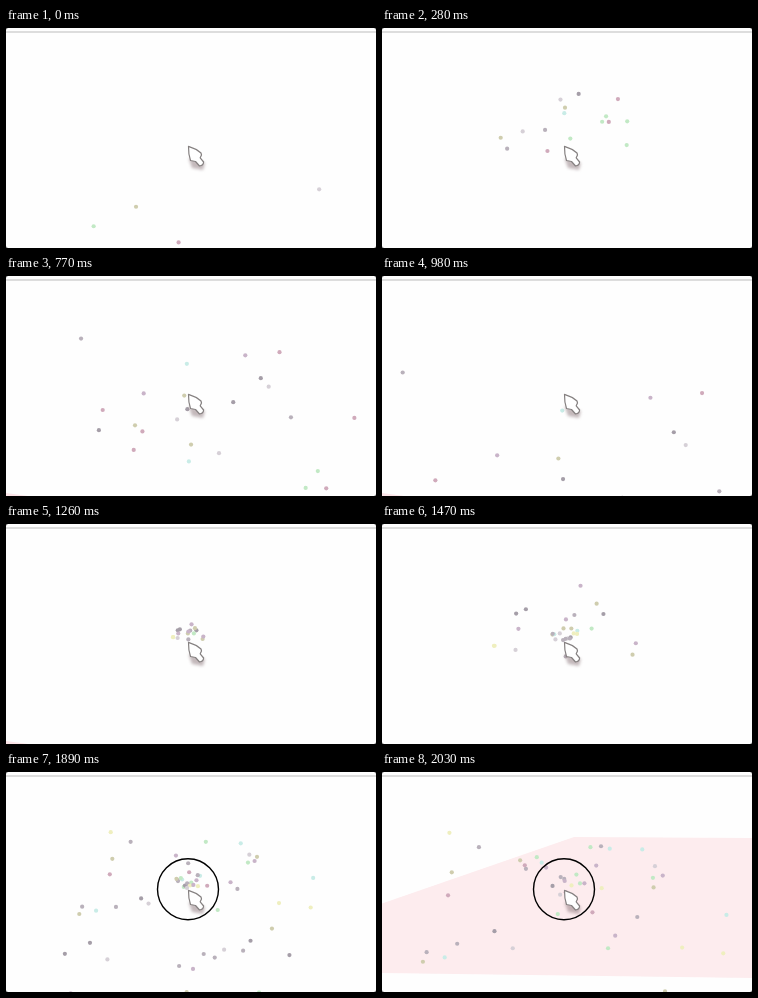
Write an HTML page that moves like this. It is 370 px wide and 220 px high and loops after 2.1 s.

```html
<!DOCTYPE html>
<html lang="en">
<head>
<meta charset="utf-8">
<title>Pointer sparks</title>
<style>
  html, body { margin: 0; width: 100%; height: 100%; overflow: hidden; background: #fff; }
  svg { display: block; width: 370px; height: 220px; }
</style>
</head>
<body>
<svg viewBox="0 0 370 220">
  <defs>
    <filter id="soft" x="-60%" y="-60%" width="220%" height="220%">
      <feGaussianBlur stdDeviation="1.8"/>
    </filter>
  </defs>
  <rect width="370" height="220" fill="#555"/>
  <rect width="370" height="220" rx="2.5" fill="#fefefe"/>
  <path d="M0 4H370" stroke="#d2d2d2" stroke-width="1.5"/>
  <path id="band" d="M0 131.500L192 65L370 66V206L0 201Z" fill="#fdecee"/>
  <path id="corner" d="M0 217L22 220H0Z" fill="#fce4e8"/>
  <g id="dots"></g>
  <path d="M182.500 130L199 135L197 142L186 140Z" fill="#8a7479" opacity=".5" filter="url(#soft)"/>
  <path d="M182.500 118.300Q190 120.500 195 125L195.500 127L194.200 129.800L197.600 134Q197.500 137.500 193.500 138L189.500 133.500L184.500 132.500Q182.300 126 182.500 118.300Z"
    fill="#fff" stroke="#858080" stroke-width="1.200" stroke-linejoin="round"/>
  <circle id="ring" cx="182" cy="117.300" r="30.500" fill="none" stroke="#000" stroke-width="1.400"/>
</svg>
<script>
const LOOP = 2100, STEP = 70;
const GRAVITY = 0.00095; // px per ms²
const ORIGIN = { x: 182, y: 118 };
const TONES = [
  '#b9b1bb', '#b9b1bb', '#a59ea8', '#d6d0d7', '#c9b4c9',
  '#d0aabb', '#c9ece7', '#efefbf', '#cfcdae', '#c2e9c5'
];
const byId = id => document.getElementById(id);
const sparks = [];

let seed = 11;
function random(min, max) {
  seed = (seed * 16807) % 2147483647;
  return min + (max - min) * seed / 2147483647;
}

// Throws sparks up from the pointer tip, all at the same moment.
function burst(born, count) {
  for (let i = 0; i < count; i++) {
    const node = document.createElementNS('http://www.w3.org/2000/svg', 'circle');
    node.setAttribute('r', 2.1);
    node.setAttribute('fill', TONES[Math.floor(random(0, TONES.length))]);
    byId('dots').append(node);
    sparks.push({ born, vx: random(-0.27, 0.27), vy: random(-0.34, -0.05), node });
  }
}

burst(-820, 16);
burst(45, 16);
burst(357, 16);
burst(1203, 16);
burst(1420, 14);
burst(1600, 18);
burst(1840, 17);

function show(node, visible) {
  node.style.display = visible ? '' : 'none';
}

function render(time) {
  for (const { born, vx, vy, node } of sparks) {
    const age = time - born;
    const y = ORIGIN.y + vy * age + GRAVITY / 2 * age * age;
    show(node, age > 0 && y < 224);
    node.setAttribute('cx', (ORIGIN.x + vx * age).toFixed(2));
    node.setAttribute('cy', y.toFixed(2));
  }
  show(byId('corner'), time >= 420 && time < 1330);
  show(byId('ring'), time >= 1820);
  show(byId('band'), time >= 2030);
}

const start = performance.now();
function tick() {
  const elapsed = (performance.now() - start) % LOOP;
  render(Math.floor(elapsed / STEP) * STEP);
  requestAnimationFrame(tick);
}
tick();
</script>
</body>
</html>
```
